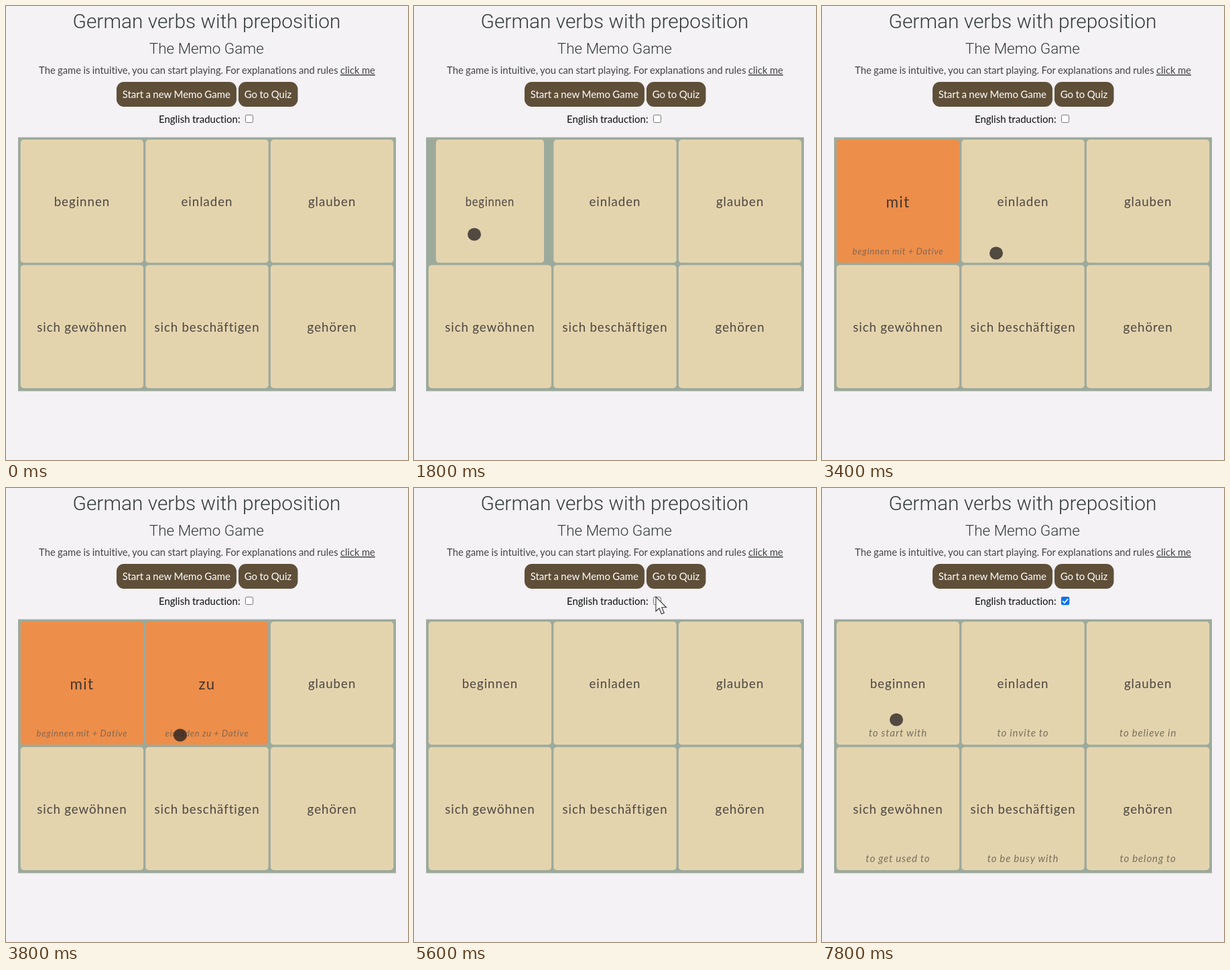
These frames come from a looping animation (600 px wide and 676 px high, 8 s). An HTML page:

```html
<!DOCTYPE html>
<html lang="en">
<head>
<meta charset="utf-8">
<title>German verbs memo game</title>
<style>
  html, body { margin: 0; width: 100%; height: 100%; overflow: hidden; background: #f4f2f5; }
  svg { display: block; width: 600px; height: 676px; }
  text {
    font: 15px Lato, sans-serif; fill: #444; text-anchor: middle;
    word-spacing: -.03em; font-variant-ligatures: none;
  }
  .title { font: 300 29.9px Roboto, sans-serif; fill: #333a3a; word-spacing: 0; }
  .subtitle { font: 300 22.5px Roboto, sans-serif; fill: #333a3a; word-spacing: 0; }
  .intro { font-size: 14.8px; }
  .button { fill: #fff; }
  .label { fill: #111; }
  .verb { font-size: 18.75px; letter-spacing: .05em; fill: #4c4740; }
  .preposition { font-size: 22.5px; letter-spacing: .06em; fill: #40362f; }
  .usage, .hint { font-style: italic; letter-spacing: .06em; }
  .usage { font-size: 13.1px; fill: #84674f; }
  .hint { fill: #77705f; }
</style>
</head>
<body>
<svg viewBox="0 0 600 676">
  <text class="title" x="299.5" y="32.5">German verbs with preposition</text>
  <text class="subtitle" x="299.3" y="71.3">The Memo Game</text>
  <text class="intro" x="300" y="101">The game is intuitive, you can start playing. For explanations and rules <tspan text-decoration="underline">click me</tspan></text>
  <g fill="#5f4f38">
    <rect x="165" y="113" width="179" height="37" rx="11"/>
    <rect x="347" y="113" width="88.5" height="37" rx="11"/>
  </g>
  <text class="button" x="254.3" y="137">Start a new Memo Game</text>
  <text class="button" x="391" y="137">Go to Quiz</text>
  <text class="label" x="288.8" y="174">English traduction:</text>
  <rect x="357.4" y="162.3" width="11.2" height="11.2" rx="2" fill="#fff" stroke="#767676"/>
  <g id="check">
    <rect x="357" y="162" width="12.2" height="12.2" rx="2" fill="#0b74ee"/>
    <path d="M359.3 168.3l2.7 2.7 5-5.8" fill="none" stroke="#fff" stroke-width="1.8"/>
  </g>
  <rect x="18" y="195.5" width="564" height="378" fill="#9caa9c"/>
  <g id="cards"></g>
  <ellipse id="dot" rx="10" ry="9.6" fill="rgb(34,28,28)" fill-opacity=".75"/>
  <path id="arrow" d="M0 0V21.5L5 17L8.5 25.5L12.3 24L8.8 15.8H15.6Z" fill="#fff" stroke="#333" stroke-width="1.1"/>
</svg>
<script>
const LOOP = 8000, STEP = 200, FLIP = 500;
const SIZE = 183.3, PITCH = 186.6;
const CHECK_TIME = 6300, FLIP_BACK = 4419;
const $ = id => document.getElementById(id);

const verbs = [
  { verb: 'beginnen', hint: 'to start with', preposition: 'mit', flipAt: 1732 },
  { verb: 'einladen', hint: 'to invite to', preposition: 'zu', flipAt: 3419 },
  { verb: 'glauben', hint: 'to believe in' },
  { verb: 'sich gewöhnen', hint: 'to get used to' },
  { verb: 'sich beschäftigen', hint: 'to be busy with' },
  { verb: 'gehören', hint: 'to belong to' }
];

// Pointer stops: time, x, y
const stops = [
  [800, 250, 12], [1400, 84, 338], [1800, 90, 340], [2400, 118, 350], [2600, 130, 352],
  [3200, 260, 368], [5000, 260, 368], [5500, 361, 162], [6400, 361, 162],
  [6800, 450, 350], [7000, 440, 470], [7200, 326, 500], [7400, 190, 546],
  [7600, 77, 440], [7800, 111, 345]
];

const face = (color, content) =>
  `<g><rect x="${-SIZE / 2}" y="${-SIZE / 2}" width="${SIZE}" height="${SIZE}" rx="4.7" fill="${color}"/>${content}</g>`;
const label = (kind, y, words) => `<text class="${kind}" y="${y}">${words}</text>`;

$('cards').innerHTML = verbs.map(({ verb, hint, preposition = '' }) => '<g>' +
  face('#e4d4ae', label('verb', 7.3, verb) + label('hint', 79.4, hint)) +
  face('#ed8e4b', label('preposition', 9, preposition) +
    label('usage', 79.4, `${verb} ${preposition} + Dative`)) + '</g>').join('');
const cards = [...$('cards').children];
const hints = document.querySelectorAll('.hint');

// CSS "ease": cubic-bezier(.25, .1, .25, 1)
function ease(x) {
  if (x <= 0) return 0;
  if (x >= 1) return 1;
  const bezier = (a, b, u) => 3 * a * u * (1 - u) ** 2 + 3 * b * u * u * (1 - u) + u ** 3;
  let low = 0, high = 1;
  for (let i = 0; i < 24; i++) {
    const mid = (low + high) / 2;
    if (bezier(.25, .25, mid) < x) low = mid; else high = mid;
  }
  return bezier(.1, 1, low);
}

function pointerAt(t) {
  const next = stops.findIndex(stop => stop[0] > t);
  if (next === 0) return null;
  if (next < 0) return stops[stops.length - 1].slice(1);
  const [t0, x0, y0] = stops[next - 1], [t1, x1, y1] = stops[next];
  const k = (t - t0) / (t1 - t0);
  return [x0 + (x1 - x0) * k, y0 + (y1 - y0) * k];
}

const show = (node, visible) => node.setAttribute('visibility', visible ? 'visible' : 'hidden');

function draw(t) {
  verbs.forEach(({ flipAt }, i) => {
    const turn = flipAt ? ease((t - flipAt) / FLIP) - ease((t - FLIP_BACK) / FLIP) : 0;
    const width = Math.cos(turn * Math.PI);
    const x = 113.4 + i % 3 * PITCH, y = 290.7 + Math.floor(i / 3) * PITCH;
    cards[i].setAttribute('transform', `translate(${x} ${y}) scale(${Math.abs(width)} 1)`);
    const [front, back] = cards[i].children;
    front.style.display = width >= 0 ? '' : 'none';
    back.style.display = width < 0 ? '' : 'none';
  });

  const checked = t >= CHECK_TIME;
  show($('check'), checked);
  hints.forEach(hint => show(hint, checked));

  const pointer = pointerAt(t);
  const onBoard = pointer && pointer[1] > 195;
  show($('dot'), onBoard);
  show($('arrow'), pointer && !onBoard);
  if (pointer) for (const id of ['dot', 'arrow']) $(id).setAttribute('transform', `translate(${pointer})`);
}

function tick() {
  draw(Math.floor(performance.now() % LOOP / STEP) * STEP);
  requestAnimationFrame(tick);
}
tick();
</script>
</body>
</html>
```
